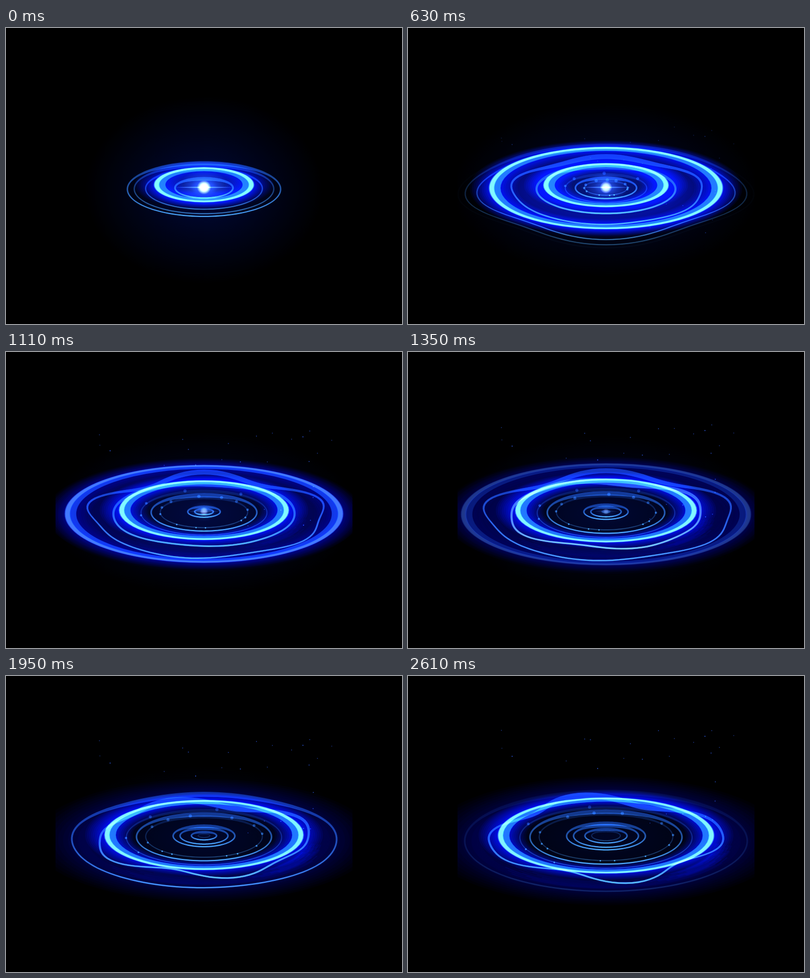
Recreate the animation shown at these times as an HTML page with a canvas. Size 800 by 600 pixels, loop 2640 ms.

```html
<!DOCTYPE html>
<html lang="en">
<head>
<meta charset="utf-8">
<title>Energy rings</title>
<style>
html, body { margin: 0; height: 100%; overflow: hidden; background: #000; }
canvas { display: block; }
</style>
</head>
<body>
<canvas id="stage" width="800" height="600"></canvas>
<script>
const ctx = document.getElementById('stage').getContext('2d');
const LOOP = 2640, STEP = 30, CX = 400, TAU = Math.PI * 2, RAD = Math.PI / 180;

const clamp = v => Math.max(0, Math.min(1, v));
const ramp = (t, from, to) => clamp((t - from) / (to - from));
const rgba = (rgb, a) => `rgba(${rgb},${a})`;

let seed = 7;
function random(min, max) {
  seed = seed * 16807 % 2147483647;
  return min + (max - min) * seed / 2147483647;
}
const many = (n, make) => Array.from({ length: n }, (_, i) => make(i));

// Shared expansion: all radii are this value plus a constant
const expansion = t => 0.026 * t + 159 * (1 - Math.pow(Math.max(0, 1 - t / 1850), 3.3));

// Height of the ring plane's centre and flattening of circles on it
const FLAT = 0.36;
const planeY = r => 323.5 + 0.00013 * r * r;

// Radial ripple in percent: a sum of cosines, angles in degrees
const wave = (d, count, size, phase) => size * Math.cos((count * d + phase) * RAD);
const RIPPLES = {
  outer: d => wave(d, 4, 4, 0) + wave(d, 5, 2, -90) + wave(d, 3, 2, 90) - 1,
  middle: d => wave(d, 1, 3.7, -33) + wave(d, 4, 3.5, -21) + wave(d, 5, 4.9, 108) + wave(d, 6, 3.4, 180) - 2.4,
  inner: (d, t) => wave(d - (t - 2000) * 0.013, 4, 6.5, 80) + wave(d, 6, 3.5, -112) + wave(d, 1, 1.6, 90) - 1.5
};
const RIPPLE_AMOUNT = {
  outer: t => ramp(t, 0, 390),
  middle: t => ramp(t, 300, 1000) * (1 - ramp(t, 1200, 2050)),
  inner: t => ramp(t, 1000, 1590) + 0.35 * ramp(t, 1590, 2610)
};

const RINGS = [
  { offsets: [156], width: 2.4, alpha: 0.9, ripple: 'outer' },
  { offsets: [142, 119], width: 2.2, alpha: 0.6, ripple: 'outer' },
  { offsets: [60], width: 3, alpha: 0.9, ripple: 'middle' },
  { offsets: [7], width: 3.6, alpha: 1, ripple: 'inner' },
  { offsets: [-72, -146, -160, -183], width: 2.7, alpha: 0.9 },
  { offsets: [-52, -91, -197], width: 1.8, alpha: 0.35 }
];

const INNER_DOTS = many(12, i => i * 30 + random(-14, 14));
const OUTER_DOTS = many(4, i => -160 + i * 45 + random(-12, 12));
const SPARKS = many(26, () => ({
  x: random(150, 660), y: random(0, 1), rise: random(0.8, 1.5), alpha: random(0.3, 0.95)
}));

function glow(y, rx, ry, rgb, alpha, mid) {
  if (alpha <= 0) return;
  ctx.save();
  ctx.translate(CX, y);
  ctx.scale(rx, ry);
  const g = ctx.createRadialGradient(0, 0, 0, 0, 0, 1);
  g.addColorStop(0, rgba(rgb, alpha));
  g.addColorStop(0.55, rgba(rgb, alpha * mid));
  g.addColorStop(1, rgba(rgb, 0));
  ctx.fillStyle = g;
  ctx.fillRect(-1, -1, 2, 2);
  ctx.restore();
}

function disc(x, y, r, style) {
  ctx.fillStyle = style;
  ctx.beginPath();
  ctx.arc(x, y, r, 0, TAU);
  ctx.fill();
}

function onPlane(y, paint) {
  ctx.save();
  ctx.translate(CX, y);
  ctx.scale(1, FLAT);
  paint();
  ctx.restore();
}

function flatArc(r, width, style, from = 0, to = TAU) {
  ctx.beginPath();
  ctx.arc(0, 0, Math.max(0.1, r), from, to);
  ctx.lineWidth = width;
  ctx.strokeStyle = style;
  ctx.stroke();
}

function hoop(r, alpha) {
  if (r < 4 || alpha <= 0) return;
  const k = Math.min(1, r / 70);
  onPlane(316.2 + 0.00015 * r * r, () => {
    ctx.scale(1, 0.98);
    ctx.globalAlpha = alpha * clamp(r / 40);
    for (let i = 1; i <= 12; i++) flatArc(r - 9 * k, i * 8 * k, 'rgba(0,12,255,0.065)');
    flatArc(r - 16 * k, 14 * k, 'rgba(38,125,215,0.85)');
    flatArc(r - 5 * k, 11 * k, 'rgb(60,120,190)');
    flatArc(r - 5 * k, 8 * k, 'rgb(70,110,80)');
  });
}

// Far side is thick and soft, near side thin and bright
function thinRing(r, width, alpha, bulge, flash) {
  alpha *= clamp(r / 18) * clamp((292 - r) / 25);
  if (r < 5 || alpha <= 0) return;
  const cy = planeY(r), ry = FLAT * r, far = Math.min(width * 1.9, r * 0.05);
  ctx.beginPath();
  for (const inset of [0, 1]) {
    for (let d = 0; d < 360; d += 3) {
      const c = Math.cos(d * RAD), s = Math.sin(d * RAD), size = bulge(d);
      const thick = inset * width * (1 - 0.25 * s) + inset * (s < 0 ? far * s * s : 0);
      const x = CX + c * (r * size - thick), y = cy + s * (ry * size - thick);
      d ? ctx.lineTo(x, y) : ctx.moveTo(x, y);
    }
    ctx.closePath();
  }
  const g = ctx.createLinearGradient(0, cy - ry, 0, cy + ry);
  const stop = (at, rgb, a, white) =>
    g.addColorStop(at, rgba(rgb.map(c => Math.round(c + (255 - c) * white)), a + (1 - a) * white));
  stop(0, [32, 90, 195], 0.62, flash * 0.1);
  stop(0.2, [36, 100, 200], 0.65, flash * 0.8);
  stop(0.5, [50, 120, 210], 0.72, flash);
  stop(1, [85, 180, 245], 0.95, flash);
  ctx.save();
  ctx.globalAlpha = alpha;
  ctx.fillStyle = ctx.strokeStyle = g;
  ctx.fill('evenodd');
  ctx.globalAlpha = alpha * 0.22;
  ctx.lineWidth = 1.6 + flash * 2;
  ctx.stroke();
  ctx.restore();
}

function ringDots(angles, r, turn, alpha) {
  if (r < 12) return;
  for (const a of angles) {
    const s = Math.sin((a + turn) * RAD), near = (s + 1) / 2;
    const x = CX + r * Math.cos((a + turn) * RAD), y = planeY(r) + FLAT * r * s;
    disc(x, y, 3.2 - 1.8 * near, rgba([45 + 30 * near, 110 + 60 * near, 210 + 30 * near], alpha * (0.4 + 0.5 * near)));
  }
}

// Soft blue haze around the outer rings, with streaks at the lower right
function smoke(e, haze, streaks) {
  onPlane(planeY(e + 60), () => {
    for (let i = 1; i <= 10; i++) flatArc(e + 35, i * 20, rgba([0, 5, 110], 0.055 * haze));
    for (let i = 0; i < 12; i++) {
      const from = 4 + i * 7 % 17, to = 44 + i * 11 % 26;
      flatArc(e - 2 + i * 2.6, 9, rgba([0, 8, 220], 0.075 * streaks), from * RAD, to * RAD);
      flatArc(e + i * 3.5, 3, rgba([0, 14, 200], 0.1 * streaks), (from + 15) * RAD, (to + 75) * RAD);
    }
  });
}

function draw(t) {
  const e = expansion(t), wide = e + 101;
  ctx.globalCompositeOperation = 'source-over';
  ctx.fillStyle = '#000';
  ctx.fillRect(0, 0, 800, 600);
  ctx.save();
  ctx.beginPath();
  ctx.rect(100, 90, 600, 510);
  ctx.clip();
  ctx.globalCompositeOperation = 'lighter';

  const spread = ramp(t, 0, 390), age = t / LOOP;
  glow(328, 240 + 70 * spread, 190 - 60 * age, [0, 14, 100], 0.6 - 0.3 * age, 0.42);
  glow(planeY(wide), wide * 1.12, wide * 0.41, [10, 30, 175], 0.04 + 0.56 * (1 - ramp(t, 390, 1200)), 0.85);
  smoke(e, spread, ramp(t, 500, 1590));

  const flash = Math.exp(-Math.pow((t - 1590) / 190, 2));
  for (const { offsets, width, alpha, ripple } of RINGS) {
    const amount = ripple ? RIPPLE_AMOUNT[ripple](t) / 100 : 0;
    const bulge = d => amount ? 1 + amount * RIPPLES[ripple](d, t) : 1;
    for (const offset of offsets) thinRing(e + offset, width, alpha, bulge, ripple === 'inner' ? flash : 0);
  }

  hoop(wide, 1 - ramp(t, 700, 1550));
  hoop(e - 8.5, 1);

  ringDots(INNER_DOTS, e - 91, t * 0.0417, 0.9);
  ringDots(OUTER_DOTS, e - 52, -t * 0.031, 0.8);

  for (const { x, y, rise, alpha } of SPARKS) {
    disc(x, 110 + 220 * y * y + rise * (227 - e), 1, rgba([50, 100, 255], alpha * ramp(t, 420, 900)));
  }

  const star = 1 - ramp(t, 390, 1640), size = 0.3 + 0.8 * star;
  glow(323, 46 * size, 32 * size, [70, 130, 240], star * 0.75, 0.32);
  glow(323, 13 * size, 13 * size, [255, 255, 255], star, 0.75);
  glow(323, 56 * size, 1.8, [110, 170, 255], star * 0.8, 0.5);
  ctx.restore();
}

function frame() {
  draw(Math.floor(performance.now() % LOOP / STEP) * STEP);
  requestAnimationFrame(frame);
}
frame();
</script>
</body>
</html>
```
